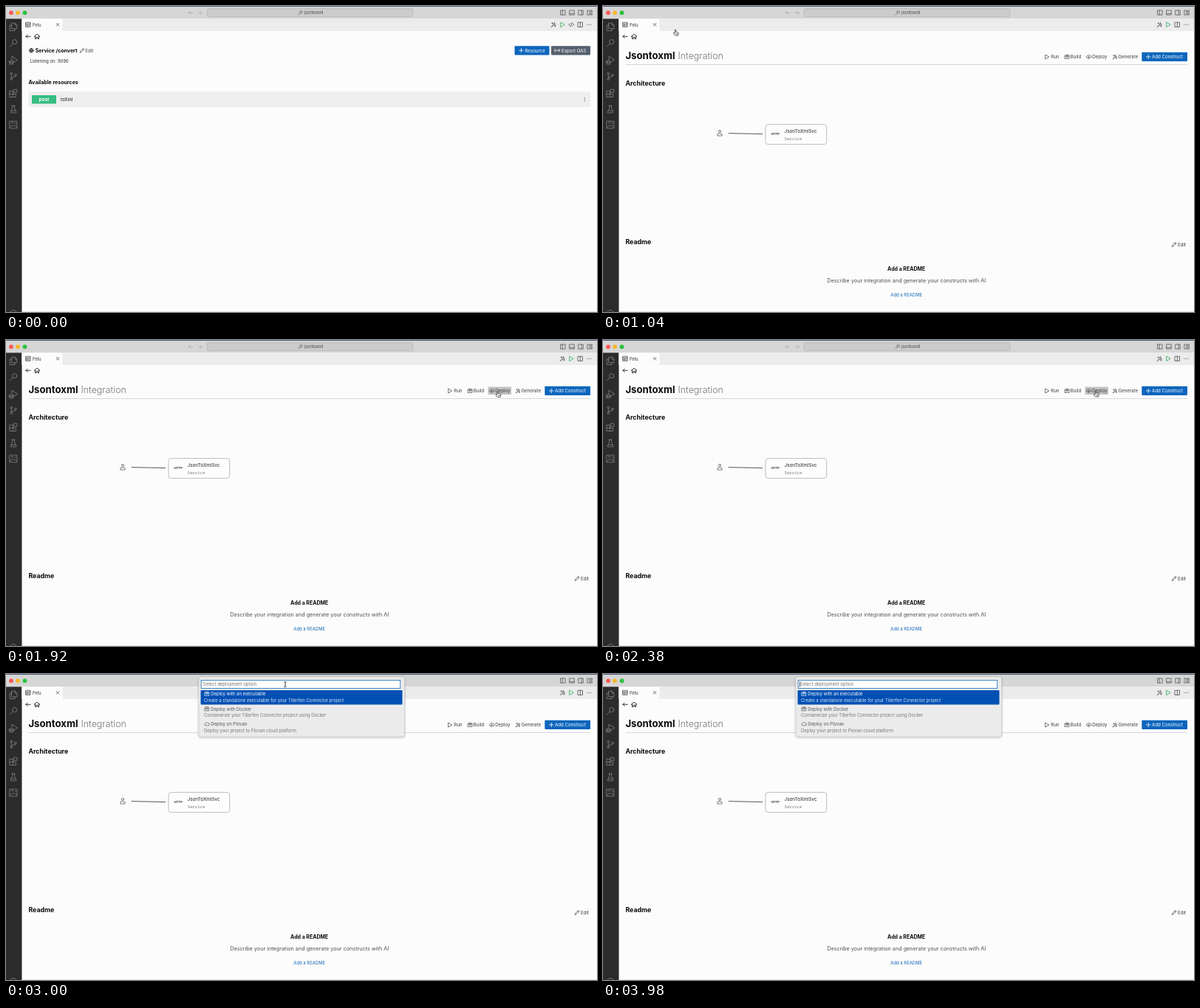
An HTML page that plays this animation: 800 px wide and 415 px high, repeating every 4000 ms.

```html
<!DOCTYPE html>
<html lang="en">
<head>
<meta charset="utf-8">
<title>Integration designer</title>
<style>
html, body { margin: 0; width: 100%; height: 100%; overflow: hidden; background: #fcfcfc; }
svg { display: block; width: 100vw; height: 100vh; }
text { font-family: Inter, "Liberation Sans", sans-serif; white-space: pre; }
.icon { fill: none; stroke-linecap: round; stroke-linejoin: round; }
</style>
</head>
<body>
<svg id="stage" viewBox="0 0 800 415"></svg>
<script>
const text = (x, y, size, str, color = '#3c3c3c', extra = '') =>
  `<text x="${x}" y="${y}" font-size="${size}" fill="${color}" ${extra}>${str}</text>`;
const bold = (x, y, size, str, color = '#0c0c0c', extra = '') =>
  text(x, y, size, str, color, 'font-weight="700" ' + extra);
const box = (x, y, w, h, fill, extra = '') =>
  `<rect x="${x}" y="${y}" width="${w}" height="${h}" fill="${fill}" ${extra}/>`;

// Icon paths are centred on 0,0 in a 16-unit square.
const icons = {
  files: 'M-3 -7H3L7 -3V4H-3ZM3 -7V-3H7M-3 -3H-7V8H3V4',
  search: 'M7 -2A4.5 4.5 0 1 1 -2 -2A4.5 4.5 0 1 1 7 -2M-1 1.5L-7 7.5',
  debug: 'M-3 -1V-7L8 0L1 5M-5 1A3 3 0 0 1 -1 4V6A3 3 0 0 1 -7 6V4A3 3 0 0 1 -3 1M-9 2L-7 4M1 2L-1 4M-9 5H1M-8 9L-6 7M0 9L-2 7',
  branch: 'M-2 -5A2 2 0 1 1 -6 -5A2 2 0 1 1 -2 -5M-2 6A2 2 0 1 1 -6 6A2 2 0 1 1 -2 6M6 -2A2 2 0 1 1 2 -2A2 2 0 1 1 6 -2M-4 -3V4M4 0Q4 2 1 2H-2Q-4 2 -4 4',
  blocks: 'M-7 -4H-1V8H-7ZM-7 2H5V8H-1M1 -7H7V-1H1Z',
  flask: 'M-3 -7H3M-2 -7V-2L-6 6Q-6 7 -5 7H5Q6 7 6 6L2 -2V-7M-4 3H4',
  picture: 'M-7 -7H7V7H-7ZM-6 5L-2 0L1 3L3 1L7 5M-4 -4H0M3 -3H5',
  left: 'M7 0H-7M-2 -5L-7 0L-2 5',
  right: 'M-7 0H7M2 -5L7 0L2 5',
  home: 'M-8 0L0 -7L8 0M-5.5 -2V7H-2V2H2V7H5.5V-2',
  close: 'M-5 -5L5 5M5 -5L-5 5',
  app: 'M-7 -7H7V7H-7ZM-7 -3H7M-4 0H0V4H-4ZM3 0H5M3 4H5',
  wand: 'M-7 7L3 -3M-5 7L4 -2M3 -7V-4M7 -1H5M-3 -6V-3M-5 -4H-1M5 2V6M3 4H7',
  play: 'M-5 -7L7 0L-5 7Z',
  code: 'M-4 -4L-8 0L-4 4M4 -4L8 0L4 4M2 -6L-2 6',
  split: 'M-7 -7H7V7H-7ZM0 -7V7',
  dots: 'M-6 0h.1M0 0h.1M6 0h.1',
  kebab: 'M0 -6v.1M0 0v.1M0 6v.1',
  pencil: 'M-7 7L-5 2L4 -7L7 -4L-2 5ZM2 -5L5 -2',
  globe: 'M7 0A7 7 0 1 1 -7 0A7 7 0 1 1 7 0M-7 0H7M0 -7Q-6 0 0 7Q6 0 0 -7',
  plus: 'M-7 0H7M0 -7V7',
  export: 'M-8 -4V4M-7 0H8M4 -4L8 0L4 4',
  parcel: 'M-7 -4L-4 -7H4L7 -4V6H-7ZM-7 -3H7M-2 -3V1H2V-3',
  cloud: 'M-4 5A3.5 3.5 0 0 1 -5 -2A5 5 0 0 1 4 -3A4 4 0 0 1 5 5Z',
  upload: 'M-4 4A3.5 3.5 0 0 1 -5 -3A5 5 0 0 1 4 -4A4 4 0 0 1 5 4M0 7V-1M-3 2L0 -1L3 2',
  person: 'M3 -4A3 3 0 1 1 -3 -4A3 3 0 1 1 3 -4M-6 7V4Q-6 2 -4 2H4Q6 2 6 4V7Z',
  panelL: 'M-7 -7H7V7H-7ZM-2 -7V7',
  panelB: 'M-7 -7H7V7H-7ZM-7 3H7',
  panelR: 'M-7 -7H7V7H-7ZM2 -7V7',
  layout: 'M-7 -7H-1V7H-7ZM3 -7H7V-2H3ZM3 2H7V7H3Z'
};
const icon = (name, x, y, size = 7, color = '#3c3c3c', weight = .7) =>
  `<path class="icon" d="${icons[name]}" stroke="${color}" stroke-width="${weight * 16 / size}"
    transform="translate(${x} ${y}) scale(${size / 16})"/>`;

const sidebar = [['files', 28], ['search', 50], ['debug', 73], ['branch', 95],
  ['blocks', 118], ['flask', 140], ['picture', 161]];
const lights = [[7, '#fc5b57'], [16, '#f5b82e'], [25.5, '#2bc23f']];

const frame =
  box(0, 0, 800, 415, '#fcfcfc') +
  box(0, 0, 800, 17.3, '#d7d6d6') + box(0, 0, 800, .9, '#3b5172') +
  lights.map(([x, c]) => `<circle cx="${x}" cy="9.2" r="2.9" fill="${c}"/>`).join('') +
  ['panelL', 'panelB', 'panelR', 'layout'].map((n, i) => icon(n, 754 + i * 12.1, 9, 7, '#4a4a4a')).join('') +
  box(0, 17.3, 21.5, 397.7, '#2b2b2b') +
  sidebar.map(([n, y]) => icon(n, 10, y, 11, '#858585', .8)).join('') +
  '<circle cx="10" cy="417" r="4.5" fill="none" stroke="#858585" stroke-width=".8"/>' +
  box(21.5, 17.3, 778.5, 16.5, '#ececec') + box(21.5, 17.3, 55, 16.7, '#fcfcfc') +
  icon('app', 30, 25.3, 7) + text(36, 27.6, 5.6, 'Pelu', '#333') +
  icon('close', 70, 25.3, 6) + icon('dots', 789.3, 25.3, 6.5, '#333', 1) +
  icon('split', 777.4, 25.3, 7) +
  icon('left', 30, 41.3, 7, '#222', .9) + icon('home', 42, 41.3, 7.4, '#222', .9) +
  box(21.5, 414.2, 778.5, .8, '#dcdcdc');

const search =
  icon('left', 250, 9.2, 6, '#a3a3a3') + icon('right', 262.5, 9.2, 6, '#a3a3a3') +
  box(272.3, 3.6, 278.5, 11, '#cdcccc', 'rx="2" stroke="#b3b3b3" stroke-width=".7"') +
  icon('search', 398.5, 9, 6.2, '#555') + text(404, 11.2, 5.65, 'jsontoxml', '#444');

const servicePage =
  icon('wand', 741, 25.3, 7) + icon('play', 753.2, 25.3, 7, '#45b36b', .9) + icon('code', 765.2, 25.3, 7) +
  icon('globe', 34.3, 60.3, 6.2, '#222', .9) + bold(39.7, 62.8, 7, 'Service /convert') +
  icon('pencil', 103, 60.3, 6.4) + text(107.3, 62.5, 6.15, 'Edit', '#444') +
  text(32.4, 76.8, 5.65, 'Listening on: 9090', '#222', 'letter-spacing=".15"') +
  box(688.5, 54.2, 47, 12.2, '#0d66bd', 'rx=".8"') + icon('plus', 697.4, 60.2, 6.2, '#fff', .8) +
  text(702.5, 62.5, 6.15, 'Resource', '#fff') +
  box(738, 54.2, 53, 12.2, '#55606f', 'rx=".8"') + icon('export', 746.5, 60.2, 7, '#fff', .8) +
  text(752, 62.5, 6.15, 'Export OAS', '#fff') +
  bold(30.5, 105.6, 7, 'Available resources') +
  box(30.5, 116.2, 760.5, 20.7, '#eeeeee') + box(35, 121, 33, 11.5, '#36bd80') +
  bold(51.4, 129, 6.4, 'post', '#fff', 'text-anchor="middle"') + text(74, 128.9, 6.05, 'toXml', '#111') +
  icon('kebab', 783.3, 126.6, 6, '#333', 1);

const overview =
  icon('wand', 753.2, 25.3, 7) + icon('play', 765.2, 25.3, 7, '#45b36b', .9) +
  bold(30.4, 72, 13.2, 'Jsontoxml') +
  text(101.5, 72, 12.4, 'Integration', '#757575', 'font-weight="300"') +
  '<g id="hover">' + box(652.5, 63.6, 31.5, 10.3, '#c2c2c2', 'rx="1"') + '</g>' +
  [['play', 601, 'Run', 606.2], ['parcel', 628.2, 'Build', 632.8],
   ['upload', 657.6, 'Deploy', 662.2], ['wand', 692.8, 'Generate', 697.4]]
    .map(([n, ix, s, x]) => icon(n, ix, 69, 6.4) + text(x, 71.2, 6.15, s)).join('') +
  box(729.3, 62.8, 61.7, 12.1, '#0d66bd', 'rx=".8"') + icon('plus', 738.2, 68.9, 6.4, '#fff', .8) +
  text(743, 71.2, 6.15, 'Add Construct', '#fff') +
  box(30.5, 79.2, 760.5, .8, '#cfcfcf') +
  bold(30.4, 108.2, 8.8, 'Architecture') +
  icon('person', 158, 172, 8.3, '#444', .7) +
  '<path d="M169.7 172.6L216 173.6" stroke="#444" stroke-width=".9"/>' +
  box(220, 160.6, 82.7, 27, '#fdfdfd', 'rx="3.5" stroke="#bdbdbd" stroke-width="1"') +
  bold(227.7, 175.3, 4.1, 'HTTP', '#333') + text(245.5, 172.2, 6.4, 'JsonToXmlSvc', '#222') +
  text(245.5, 181.6, 5.7, 'Service', '#777', 'style="font-family:\'Noto Sans Mono\',monospace"') +
  bold(30.4, 323.2, 8.8, 'Readme') +
  icon('pencil', 773.2, 323.4, 6.5) + text(778, 325.7, 6.2, 'Edit') +
  bold(410.7, 359, 7, 'Add a README', '#0c0c0c', 'text-anchor="middle"') +
  text(410.7, 374.8, 7.25, 'Describe your integration and generate your constructs with AI', '#505050', 'text-anchor="middle"') +
  text(410.7, 393.8, 5.95, 'Add a README', '#1668b4', 'text-anchor="middle"');

const options = [
  ['parcel', 'Deploy with an executable', 'Create a standalone executable for your Tillerfen Connector project'],
  ['parcel', 'Deploy with Docker', 'Containerize your Tillerfen Connector project using Docker'],
  ['cloud', 'Deploy on Plovan', 'Deploy your project to Plovan cloud platform']
];
const menu =
  box(261, 4, 278.5, 81, '#ebebeb', 'rx="3" stroke="#c4c4c4" stroke-width=".6" filter="url(#shade)"') +
  box(264.2, 8.4, 269.5, 11, '#fff', 'stroke="#2b78bd" stroke-width=".9"') +
  text(266.8, 16, 6, 'Select deployment option', '#707070') +
  box(263.5, 22, 273, 19.4, '#0350b4', 'rx="1"') +
  options.map(([n, title, note], i) => {
    const y = 29 + i * 20.5, on = i === 0;
    return icon(n, 272, y - 2.1, 6.4, on ? '#fff' : '#555') +
      text(277.2, y, 5.97, title, on ? '#fff' : '#555') +
      text(268, y + 8.6, 5.95, note, on ? '#dbe7f6' : '#777');
  }).join('') +
  '<g id="caret">' + box(266.3, 10.4, .7, 7.2, '#111') + '</g>';

const cursors =
  `<g id="cursor">
    <path id="arrow" d="M0 0V6.8L1.5 5.5L2.5 7.8L3.6 7.3L2.6 5.1H4.7Z" fill="#000" stroke="#fff" stroke-width=".5"/>
    <path id="hand" d="M-.7 .4Q0 -.5 .6 .4V3L3.7 3.7Q4.4 4 4.2 5L3.6 8H-.4L-2.7 4.9Q-2.6 3.8 -1.6 4.3L-.7 5ZM1.3 5V6.6M2.6 5V6.6" fill="#fff" stroke="#222" stroke-width=".7"/>
    <path id="beam" d="M-1.5 -3.5Q0 -3.5 0 -2.5Q0 -3.5 1.5 -3.5M0 -2.7V2.7M-1.5 3.5Q0 3.5 0 2.5Q0 3.5 1.5 3.5" fill="none" stroke="#111" stroke-width=".8"/>
  </g>`;

document.getElementById('stage').innerHTML =
  `<defs><filter id="shade" x="-5%" y="-10%" width="110%" height="125%">
    <feDropShadow dx="0" dy="1" stdDeviation="1.6" flood-opacity=".28"/></filter></defs>
  ${frame}<g id="search">${search}</g><g id="service">${servicePage}</g>
  <g id="overview">${overview}</g><g id="menu">${menu}</g>${cursors}`;

const LOOP = 4000, PAGE = 740, MENU = 2620;
// Pointer stops: time, x, y.
const path = [[60, 803, 322], [500, 43, 40], [920, 43, 40], [1040, 98, 32], [1540, 620.5, 79],
  [1640, 632, 80], [1960, 667, 69], [2560, 667, 69], [2960, 378, 14], [3080, 378, 14],
  [3520, 464.3, 4], [3620, 478, -9]];

function pointer(t) {
  const i = path.findIndex(p => p[0] > t);
  if (i < 1) return null;
  const [t0, x0, y0] = path[i - 1], [t1, x1, y1] = path[i];
  const u = (t - t0) / (t1 - t0), k = u * u * (3 - 2 * u);
  return [x0 + (x1 - x0) * k, y0 + (y1 - y0) * k];
}

const show = (id, on) => document.getElementById(id).setAttribute('visibility', on ? 'inherit' : 'hidden');

function draw(t) {
  const open = t >= MENU, at = pointer(t);
  const [x, y] = at || [-20, -20];
  const onDeploy = !open && t >= PAGE && x > 652 && x < 684 && y > 63 && y < 74;
  const hand = onDeploy || (t > 470 && t < 1070);
  const beam = open && x > 264 && x < 534 && y > 8 && y < 20;
  show('service', t < PAGE);
  show('overview', t >= PAGE);
  show('search', !open);
  show('menu', open);
  show('hover', onDeploy);
  show('caret', open && (t < 2990 || t >= 3490));
  show('cursor', at);
  show('hand', at && hand);
  show('beam', at && beam);
  show('arrow', at && !hand && !beam);
  document.getElementById('cursor').setAttribute('transform', `translate(${x} ${y})`);
}

const start = performance.now();
function tick() {
  draw((performance.now() - start) % LOOP);
  requestAnimationFrame(tick);
}
tick();
</script>
</body>
</html>
```
